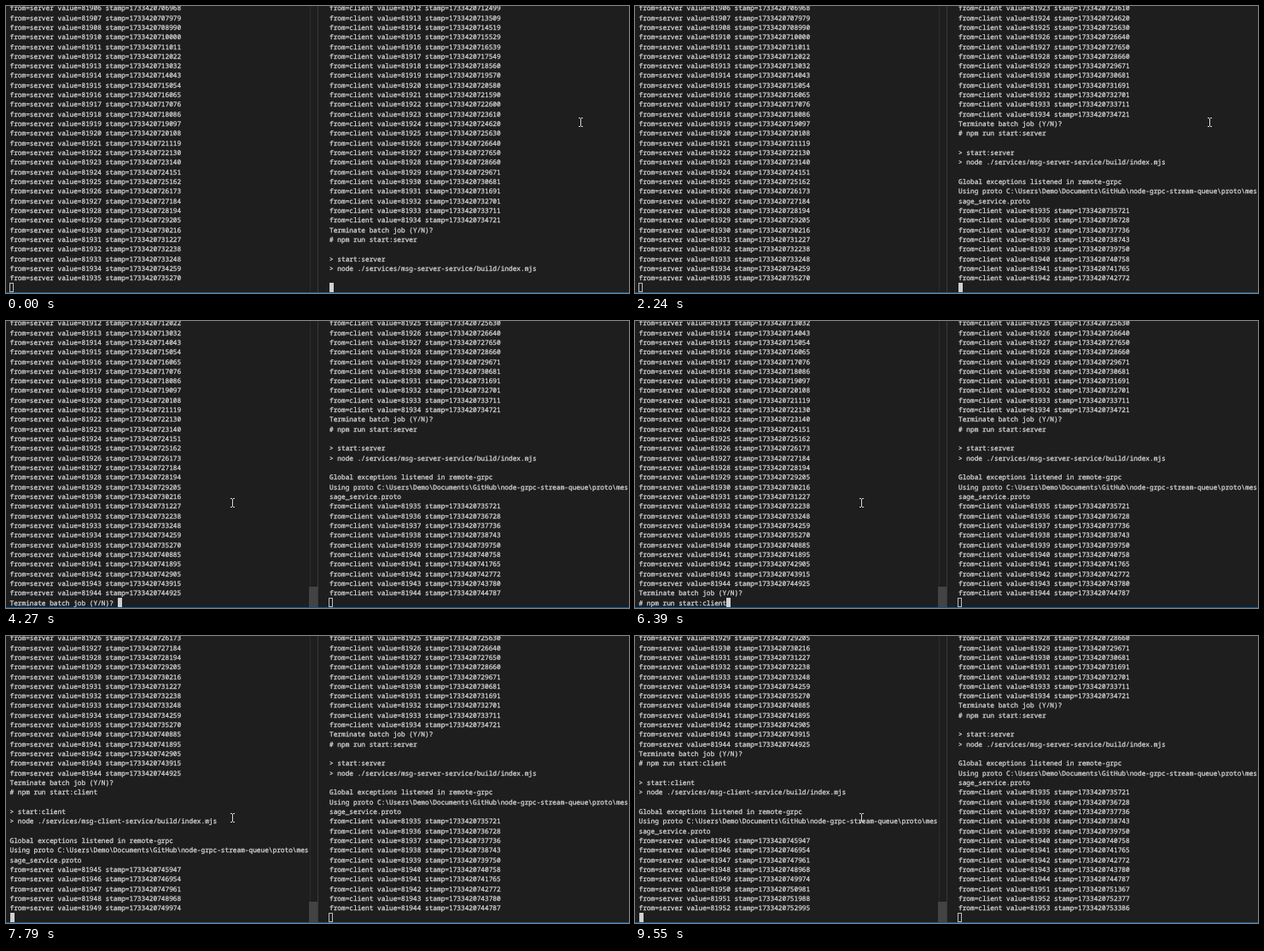
An HTML page with a canvas that plays this animation: 730x337 px, repeating every 9.58 s.

```html
<!DOCTYPE html>
<html lang="en">
<head>
<meta charset="utf-8">
<title>Two terminals</title>
<style>
  html, body { margin: 0; width: 100%; height: 100%; overflow: hidden; background: #1e1e1e; }
  canvas { display: block; }
</style>
</head>
<body>
<canvas id="stage" width="730" height="337"></canvas>
<script>
const ctx = document.getElementById('stage').getContext('2d');
const LOOP = 9580;
const CHAR = 4.667, ROW = 11.32, LAST_BASELINE = 333.5;
const FONT_SIZE = 40, SCALE = CHAR / (FONT_SIZE * 0.6);
const FOCUS_SWITCH = 3850;
const EPOCH = 1733420700000;

// Playback runs faster than the clock behind the stamps.
const timeOfStamp = stamp => 8550 + (stamp - 51989) / 1.45;

const lines = (time, ...texts) => texts.map(text => ({ time, text }));

// Evenly spaced messages; those queued before the connection arrive together at `since`.
const messages = (sender, first, last, firstStamp, lastStamp, since = 0) =>
  Array.from({ length: last - first + 1 }, (_, i) => {
    const stamp = Math.round(firstStamp + (lastStamp - firstStamp) * i / (last - first));
    return {
      time: Math.max(since, timeOfStamp(stamp)),
      text: `from=${sender} value=${first + i} stamp=${EPOCH + stamp}`
    };
  });

const npmOutput = (time, role) => lines(time,
  '', `> start:${role}`, `> node ./services/msg-${role}-service/build/index.mjs`, '');

const startup = time => lines(time,
  'Global exceptions listened in remote-grpc',
  'Using proto C:\\Users\\Demo\\Documents\\GitHub\\node-grpc-stream-queue\\proto\\mes',
  'sage_service.proto');

const QUESTION = 'Terminate batch job (Y/N)? ';
const CLIENT_COMMAND = '# npm run start:client';

const left = {
  x: 4.5,
  log: [
    ...messages('server', 81906, 81908, 6968, 8990),
    ...messages('server', 81910, 81935, 10000, 35270),
    ...messages('server', 81940, 81944, 40885, 44925, 2270),
    ...lines(4700, QUESTION),
    ...lines(6580, CLIENT_COMMAND),
    ...npmOutput(6750, 'client'),
    ...startup(7400),
    ...messages('server', 81945, 81952, 45947, 52995, 7550)
  ],
  prompts: [
    { from: 4180, to: 4700, text: QUESTION },
    { from: 4700, to: 5100, text: '# ' },
    { from: 5100, to: 6580, text: CLIENT_COMMAND }
  ]
};

const right = {
  x: 379,
  log: [
    ...messages('client', 81912, 81934, 12499, 34721),
    ...lines(0, QUESTION, '# npm run start:server'),
    ...npmOutput(0, 'server'),
    ...startup(200),
    ...messages('client', 81935, 81944, 35721, 44787, 2210),
    ...messages('client', 81951, 81953, 51367, 53386)
  ],
  prompts: []
};

function rect(color, x, y, w, h) {
  ctx.fillStyle = color;
  ctx.fillRect(x, y, w, h);
}

function drawText(text, x, y) {
  ctx.save();
  ctx.translate(x, y);
  ctx.scale(SCALE, SCALE);
  ctx.font = `${FONT_SIZE}px "Noto Sans Mono", "DejaVu Sans Mono", monospace`;
  ctx.textRendering = 'geometricPrecision';
  ctx.fillStyle = ctx.strokeStyle = '#d0d0d0';
  ctx.lineWidth = 1.6;
  ctx.lineJoin = 'round';
  ctx.fillText(text, 0, 0);
  ctx.strokeText(text, 0, 0);
  ctx.restore();
}

function drawPane(pane, time, focused) {
  const shown = pane.log.filter(line => line.time <= time).slice(-30).reverse();
  const prompt = pane.prompts.find(p => time >= p.from && time < p.to);
  const current = prompt ? prompt.text : '';
  [current, ...shown.map(line => line.text)].forEach((text, i) =>
    drawText(text, pane.x, LAST_BASELINE - i * ROW));

  const x = Math.round(pane.x + current.length * CHAR);
  if (focused) {
    rect('#d0d0d0', x, 325, 5, 11);
  } else {
    ctx.strokeStyle = '#bdbdbd';
    ctx.lineWidth = 1;
    ctx.strokeRect(x - 0.5, 325.5, 4, 10);
  }
}

function pointerAt(time) {
  const p = Math.min(1, Math.max(0, (time - 3200) / 500));
  const eased = p * p * (3 - 2 * p);
  return { x: Math.round(673 - 408 * eased), y: Math.round(136 + 77 * eased) };
}

function drawPointer({ x, y }) {
  rect('#d8d8d8', x, y - 4, 1, 9);
  for (const edge of [y - 5, y + 5]) {
    rect('#d8d8d8', x - 2, edge, 2, 1);
    rect('#d8d8d8', x + 1, edge, 2, 1);
  }
}

function draw(time) {
  const pointer = pointerAt(time);
  const leftFocused = time >= FOCUS_SWITCH;
  rect('#1e1e1e', 0, 0, 730, 337);
  rect('#2b2b2b', 356, 0, 1, 336);
  rect('#3a3a3a', 365, 0, 1, 336);
  if (pointer.x < 365) rect('#434343', 355, 312, 10, 24);
  drawPane(left, time, leftFocused);
  drawPane(right, time, !leftFocused);
  rect('#0a5a9c', 0, 336, 730, 1);
  drawPointer(pointer);
}

const start = performance.now();
function tick() {
  draw((performance.now() - start) % LOOP);
  requestAnimationFrame(tick);
}
tick();
</script>
</body>
</html>
```
